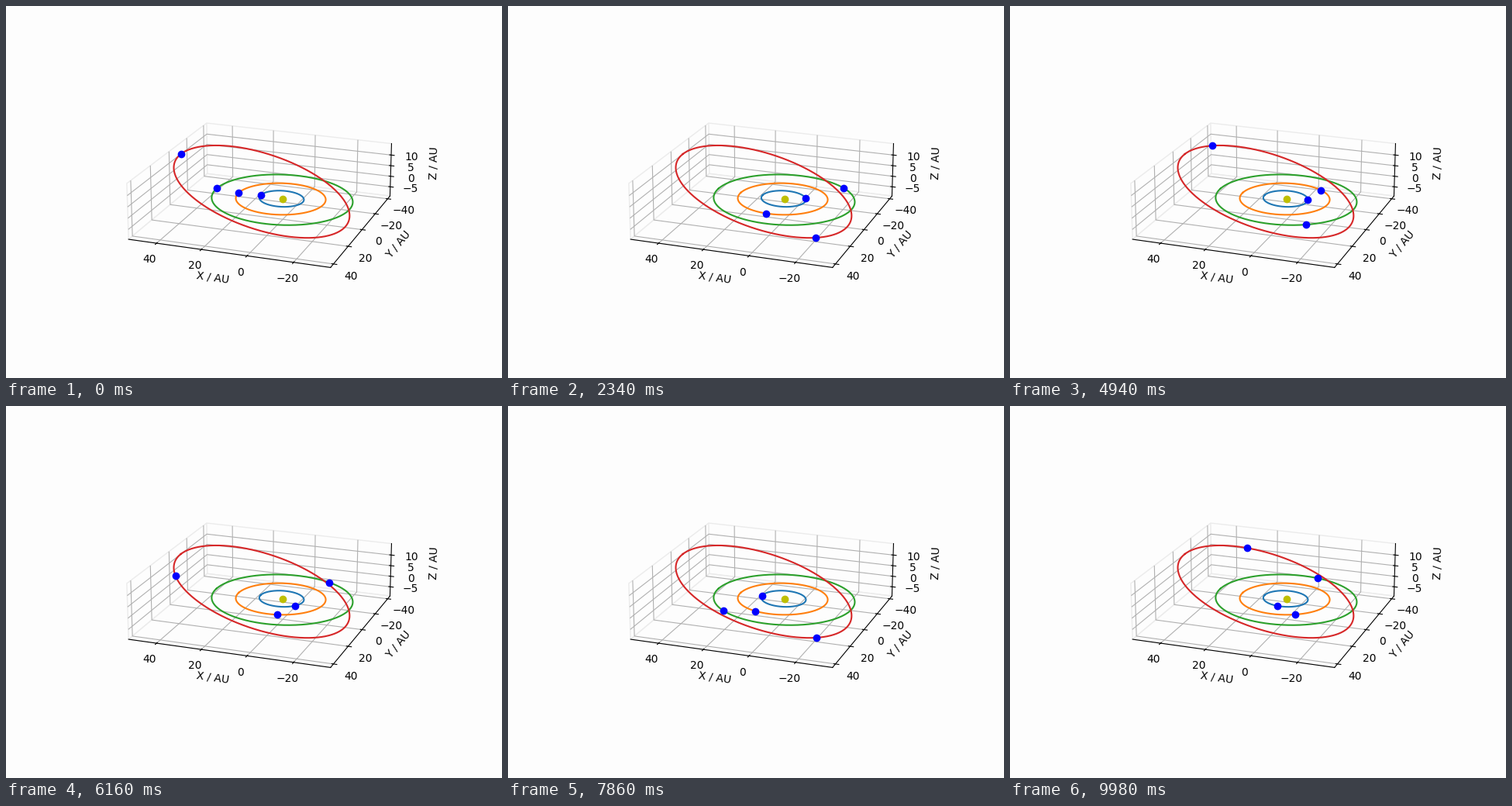
Write a matplotlib script that moves like this. It is 640 by 480 pixels and loops after 10000 ms.

```python
import numpy as np
import matplotlib.pyplot as plt
from matplotlib.animation import FuncAnimation
from mpl_toolkits.mplot3d import proj3d

FRAMES, INTERVAL = 500, 20
YEARS_PER_FRAME = 0.9
BACKGROUND, PANE_EDGE = "#fdfdfd", "#ebebeb"

# semi-major axis / AU, eccentricity, inclination / degrees, period / years
PLANETS = [
    (9.58, 0.06, 2.49, 29.447),
    (19.29, 0.05, 0.77, 84.01),
    (30.25, 0.01, 1.77, 164.79),
    (39.51, 0.25, 17.5, 248.09),
]


def position(anomaly, a, e, tilt):
    """Point on the orbit; the eccentric anomaly counts from aphelion."""
    along = a * (np.cos(anomaly) + e)
    y = a * np.sqrt(1 - e**2) * np.sin(anomaly)
    tilt = np.radians(tilt)
    return np.array([along * np.cos(tilt), y, along * np.sin(tilt)])


def kepler(mean, e):
    """Solve mean = E + e sin E by Newton's method."""
    anomaly = mean.copy()
    for _ in range(8):
        anomaly -= (anomaly + e * np.sin(anomaly) - mean) / (1 + e * np.cos(anomaly))
    return anomaly


def padded(values, margin):
    low, high = values.min(), values.max()
    middle, half = (low + high) / 2, (high - low) / 2
    half *= (1 + 2 * margin) * 25 / 24
    return middle - half, middle + half


fig = plt.figure(figsize=(6.4, 4.8), dpi=100, facecolor=BACKGROUND)
ax = fig.add_subplot(projection="3d", facecolor=BACKGROUND)

turn = np.linspace(0, 2 * np.pi, 1000)
orbits = [position(turn, a, e, tilt) for a, e, tilt, _ in PLANETS]
for orbit in orbits:
    ax.plot(*orbit)
ax.plot([0], [0], [0], "yo")

xs, ys, zs = np.concatenate(orbits, axis=1)
limits = [padded(xs, 0.05), padded(ys, 0.05), padded(zs, 0)]
ax.set(xlim=limits[0], ylim=limits[1], zlim=limits[2],
       xlabel="X / AU", ylabel="Y / AU", zlabel="Z / AU")
ax.set_xticks([-20, 0, 20, 40])
ax.set_yticks([-40, -20, 0, 20, 40])
ax.set_zticks([-5, 0, 5, 10])
ax.set_box_aspect([high - low for low, high in limits])
ax.view_init(elev=20, azim=110)
for axis in (ax.xaxis, ax.yaxis, ax.zaxis):
    axis.set_pane_color(BACKGROUND)
    axis.pane.set_edgecolor(PANE_EDGE)

# The scene is fixed, so render it once and move only the planets.
fig.canvas.draw()
scene = np.array(fig.canvas.buffer_rgba())

years = np.arange(FRAMES) * YEARS_PER_FRAME
tracks = []
for a, e, tilt, period in PLANETS:
    point = position(kepler(2 * np.pi * years / period, e), a, e, tilt)
    u, v, _ = proj3d.proj_transform(*point, ax.get_proj())
    tracks.append(ax.transData.transform(np.column_stack([u, v])))
tracks = np.array(tracks)

ax.remove()
fig.figimage(scene, zorder=-1)
overlay = fig.add_axes([0, 0, 1, 1])
overlay.set(xlim=(0, 640), ylim=(0, 480))
overlay.axis("off")
dots, = overlay.plot([], [], "bo")


def update(frame):
    dots.set_data(tracks[:, frame, 0], tracks[:, frame, 1])
    return dots,


anim = FuncAnimation(fig, update, frames=FRAMES, interval=INTERVAL,
                     init_func=lambda: update(0), repeat=True, repeat_delay=0)
plt.show()
```
